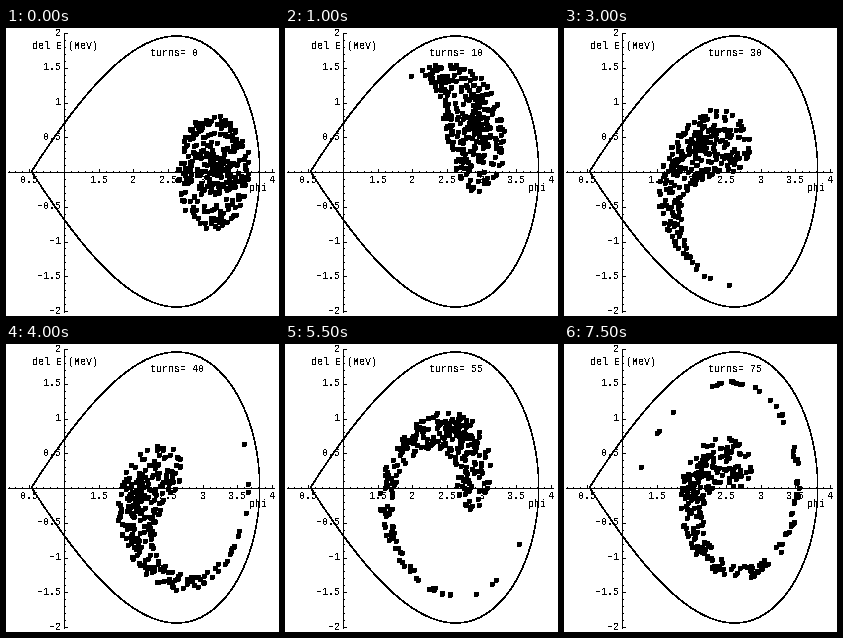
A matplotlib script for the animation above (8000 ms loop, 273 by 288 pixels).

```python
import matplotlib.pyplot as plt
import numpy as np
from matplotlib.animation import FuncAnimation
from matplotlib.path import Path

W, H, DPI = 273, 288, 64
PT = 72 / DPI                    # points per pixel
FRAMES, STEP = 16, 5             # pictures, turns between pictures
COUNT = 300
PHI_S = 5 * np.pi / 6            # synchronous phase
PHI_U = np.pi - PHI_S            # unstable fixed point
E_MAX = 1.95                     # bucket half height, MeV
VOLT = 1.0                       # energy kick per turn, MeV


def well(phi):
    return np.cos(phi) + phi * np.sin(PHI_S)


DEPTH = well(PHI_U) - well(PHI_S)
SLIP = 2 * VOLT * DEPTH / E_MAX ** 2


def px(phi):
    return 58.5 + 69.3 * (phi - 1)


def py(e):
    return 143.5 - 69.5 * e


def kick(phi):
    return VOLT * (np.sin(phi) - np.sin(PHI_S)) / 2


def start_bunch():
    rng = np.random.default_rng(12)
    r = rng.random(COUNT) ** 0.58
    a = rng.random(COUNT) * 2 * np.pi
    phi = 3.125 + 0.525 * r * np.cos(a)
    e = 0.82 * r * np.sin(a)
    phi[:3], e[:3] = (3.645, 3.64, 3.635), (0.29, 0.15, -0.1)
    return phi, e


def track():
    phi, e = start_bunch()
    shots = []
    for turn in range(FRAMES * STEP):
        if turn % STEP == 0:
            xy = np.column_stack([px(phi), py(e)])
            shots.append(np.floor(xy) + 0.5)
        e = e + kick(phi)
        phi = phi + SLIP * e
        e = e + kick(phi)
    return shots


plt.rcParams.update({"font.family": "Liberation Mono",
                     "font.size": 10 * PT,
                     "text.antialiased": False,
                     "lines.antialiased": False,
                     "lines.linewidth": 0.5 * PT})
fig = plt.figure(figsize=(W / DPI, H / DPI), dpi=DPI, facecolor="white")
ax = fig.add_axes([0, 0, 1, 1])
ax.set_xlim(0, W)
ax.set_ylim(H, 0)
ax.axis("off")


def line(xs, ys):
    ax.plot(xs, ys, color="black", solid_capstyle="butt")


def rule(x1, y1, x2, y2):
    # keep off the half pixel, where snapping would round to the next one
    line([np.floor(x1) + 0.1, np.floor(x2) + 0.1],
         [np.floor(y1) + 0.9, np.floor(y2) + 0.9])


def label(x, y, s, ha="left"):
    return ax.text(x, y, s, ha=ha, va="baseline", color="black")


def number(k):
    return f"{k / 10:g}".replace("-", "\u2212")


def draw_axes():
    x0, y0 = px(1), py(0)
    rule(2, y0, 268, y0)
    rule(x0, 4, x0, 283)
    for k in range(2, 41):
        x = px(k / 10)
        rule(x, y0, x, y0 - (3 if k % 5 == 0 else 1))
        if k % 5 == 0 and k != 10:
            label(x, 155, number(k), "center")
    for k in range(-20, 21):
        y = py(k / 10)
        rule(x0, y, x0 + (3 if k % 5 == 0 else 1), y)
        if k % 5 == 0 and k:
            label(55, y + 3, number(k), "right")
    label(26, 21, "del E (MeV)")
    label(243, 163, "phi")


def draw_bucket():
    phi = np.linspace(PHI_U, 3.83, 1500)
    gap = (well(PHI_U) - well(phi)) / DEPTH
    phi, gap = phi[gap >= 0], gap[gap >= 0]
    e = E_MAX * np.sqrt(gap)
    line(px(np.r_[phi, phi[::-1]]), py(np.r_[e, -e[::-1]]))


def pixel_disc():
    # 5 x 5 pixels without the corners
    a, b = 1.5, 2.5
    corner = [(b, a), (a, a), (a, b)]
    pts = [(x, y) for x, y in corner]
    pts += [(-x, y) for x, y in corner[::-1]]
    pts += [(-x, -y) for x, y in corner]
    pts += [(x, -y) for x, y in corner[::-1]]
    return Path(pts + pts[:1], closed=True)


draw_axes()
draw_bucket()
shots = track()
dots = ax.scatter(*shots[0].T, s=(5 * PT) ** 2, c="black", linewidths=0,
                  marker=pixel_disc(), zorder=3)
counter = label(144, 28, "turns= 0")


def update(i):
    dots.set_offsets(shots[i])
    counter.set_text(f"turns= {i * STEP}")
    return dots, counter


anim = FuncAnimation(fig, update, frames=FRAMES, interval=500,
                     repeat=True, repeat_delay=0)
plt.show()
```
